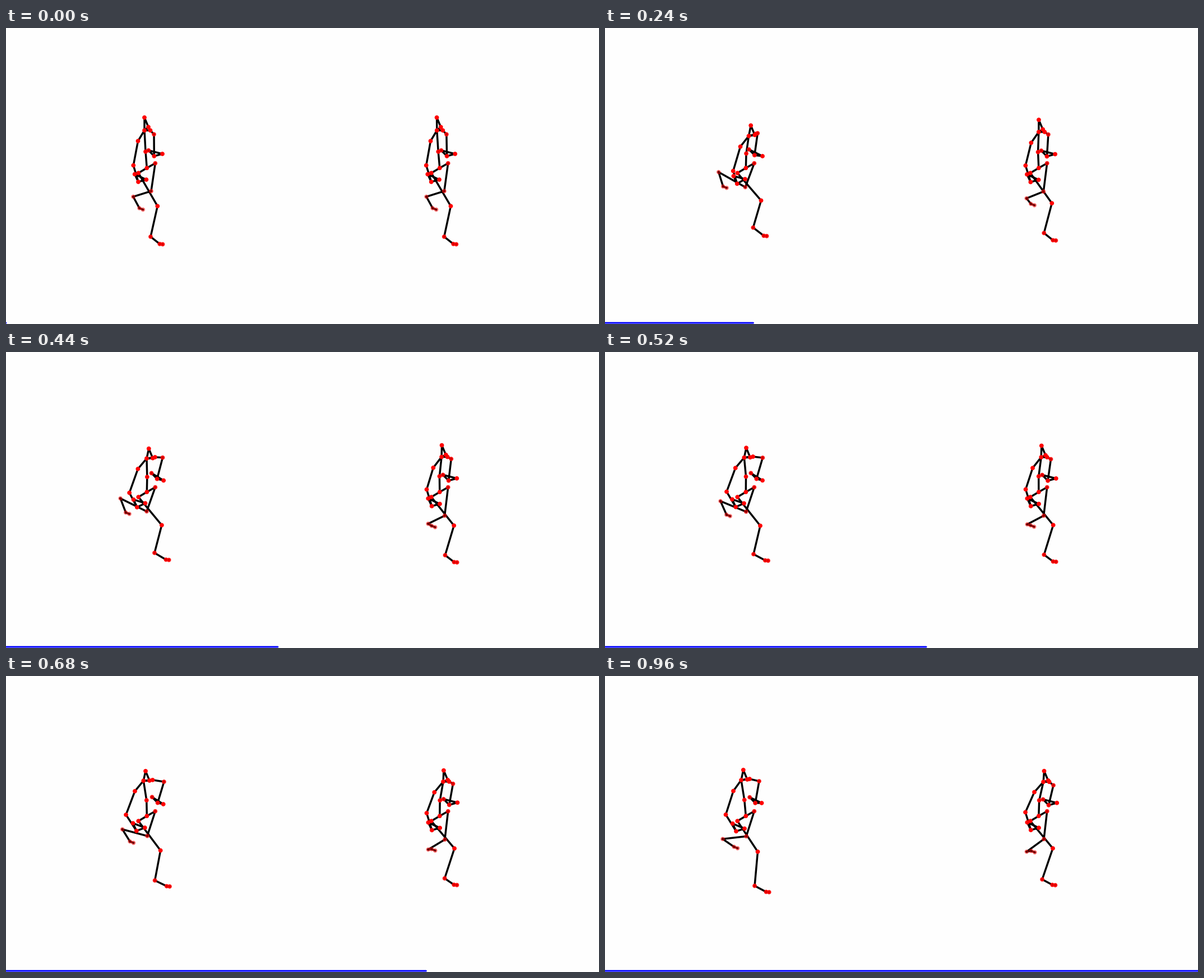
Animation of 1058x529 px, one loop 1 s. Source, as a matplotlib script:

```python
import numpy as np
import matplotlib.pyplot as plt
from matplotlib.animation import FuncAnimation

W, H, DPI = 1058, 529, 100
FRAMES, STEP = 25, 40

CHAINS = ["root rhip rknee rankle rfoot rtoe",
          "root lhip lknee lankle lfoot ltoe",
          "root spine neck nose head neck",
          "neck collar lshoulder lelbow lwrist lhand lelbow",
          "neck rshoulder relbow rwrist rtip rhand rwrist"]

# joints further from the viewer are more transparent
ALPHA = dict(lankle=.42, lfoot=.42, ltoe=.42, lknee=.55, lhip=.8, lshoulder=.82,
             lhand=.82, lelbow=.92, rankle=.85, rfoot=.85, rtoe=.85, spine=.92)

# pose from which both figures start
POSE = dict(
    root=(251.3, 250.2), spine=(249, 221), neck=(247, 183), nose=(254, 177),
    head=(247, 160), collar=(257.5, 183),
    lshoulder=(264, 190), lelbow=(264.3, 229), lwrist=(279, 225), lhand=(254.3, 218.7),
    rshoulder=(235.5, 202), relbow=(227.3, 245.5), rwrist=(236, 275),
    rhand=(229.7, 261.3), rtip=(250.3, 271),
    rhip=(236.3, 259.2), rknee=(270.3, 318.3), rankle=(258, 373),
    rfoot=(274.3, 386), rtoe=(279.5, 386.5),
    lhip=(266.3, 241.7), lknee=(259, 291.5), lankle=(227, 301.5),
    lfoot=(238, 322), ltoe=(244.3, 324.5))

# shifts from the starting pose at the key times; joints that move alike share one
STRIDE = {
    "spine": [(3, 3.3), (2.5, 1.7), (-.3, .5)],
    "neck": [(9.5, 10), (1.3, 5.7), (-4, 3)],
    "head nose": [(13.2, 14.2), (5, 11.3), (-.2, 7.9)],
    "collar": [(11.5, 6.3), (6.5, 4), (.5, 1)],
    "lshoulder": [(8.3, -2), (17.3, -1), (11, -2)],
    "lelbow lhand": [(2.5, -1.7), (6, -2.3), (3.8, -2)],
    "lwrist": [(2, 4), (2, 4.5), (.5, 2)],
    "rshoulder": [(6, 10), (-2.8, 5.3), (-6.5, 3.5)],
    "relbow": [(1.4, 10), (-10.3, 4.2), (-11.8, 2.3)],
    "rwrist rhand": [(-.3, 3.3), (-2.8, 2), (-2, 2.5)],
    "rtip": [(-.3, -1), (-2.3, -.5), (-1.3, 1.7)],
    "rknee": [(8.2, -10), (6.7, -7.8), (2.2, -4.3)],
    "rankle": [(6.3, -16.3), (7, -11.7), (9, 2)],
    "rfoot rtoe": [(9, -14.7), (11.5, -13.6), (13.2, -.2)],
    "lknee": [(-8.7, -7), (-7.3, -6), (-7, -5)],
    "lankle": [(-24.3, -44), (-21, -35), (-17, -10.2)],
    "lfoot ltoe": [(-27.3, -38.8), (-21.2, -31.2), (-7.8, -16.7)],
}
SWAY = {
    "spine": [(2.5, 1.2), (3.5, 1.2)],
    "neck collar": [(9.4, 5), (13.3, 6.2)],
    "head nose": [(10.2, 7.5), (14.9, 9.8)],
    "lshoulder": [(9.6, 1.5), (14.1, 5.3)],
    "lelbow lwrist lhand": [(3.5, 1), (5, 1.8)],
    "rshoulder": [(5.5, 5.3), (8.5, 5.5)],
    "relbow": [(.8, 0), (.3, -2)],
    "rwrist rhand rtip": [(1, .5), (1, .3)],
    "rknee": [(6.2, -9), (5.5, -10.3)],
    "rankle": [(1.6, -10.7), (-1.7, -9.5)],
    "rfoot rtoe": [(1.3, -11.6), (0, -12.7)],
    "lknee": [(.8, 1), (1.1, 0)],
    "lankle": [(3.3, 6.5), (2.3, 12.5)],
    "lfoot ltoe": [(-2, -12.2), (-.8, -9.4)],
}


def glide(times, points):
    """Smooth curve through the points, sampled at every frame."""
    t, p = np.array(times, float), np.array(points, float)
    slope = np.gradient(p, t, axis=0, edge_order=2)
    x = np.arange(FRAMES)
    k = np.clip(np.searchsorted(t, x, side="right") - 1, 0, len(t) - 2)
    h = (t[k + 1] - t[k])[:, None]
    u = (x - t[k])[:, None] / h
    return ((1 + 2 * u) * (1 - u) ** 2 * p[k] + u * (1 - u) ** 2 * h * slope[k]
            + u * u * (3 - 2 * u) * p[k + 1] + u * u * (u - 1) * h * slope[k + 1])


class Skeleton:
    def __init__(self, ax, pose, times, motion):
        self.paths = {n: np.tile(np.array(p, float), (FRAMES, 1)) for n, p in pose.items()}
        for names, shifts in motion.items():
            shift = glide([0] + times, [(0, 0)] + shifts)
            for n in names.split():
                self.paths[n] += shift
        self.line, = ax.plot([], [], color="black", lw=2.5, zorder=2)
        colors = [(1, 0, 0, ALPHA.get(n, 1)) for n in pose]
        self.dots = ax.scatter(*zip(*pose.values()), s=20, c=colors, lw=1.1, zorder=3)

    def draw(self, i):
        pts = []
        for chain in CHAINS:
            names = chain.split()
            for a, b in zip(names, names[1:]):
                pts += [self.paths[a][i], self.paths[b][i], (np.nan, np.nan)]
        self.line.set_data(*zip(*pts))
        self.dots.set_offsets([p[i] for p in self.paths.values()])


fig = plt.figure(figsize=(W / DPI, H / DPI), dpi=DPI, facecolor="#fefefe")
ax = fig.add_axes([0, 0, 1, 1])
ax.set_xlim(0, W)
ax.set_ylim(H, 0)
ax.axis("off")
ax.set_autoscale_on(False)

# the second figure stands half a stage further right, tilted very slightly
tilted = {n: (x + 522.5 + .01 * (y - 250), y) for n, (x, y) in POSE.items()}
figures = [Skeleton(ax, POSE, [6, 13, 24], STRIDE),
           Skeleton(ax, tilted, [13, 24], SWAY)]
bar, = ax.plot([], [], color="blue", lw=2.1, solid_capstyle="round", snap=False, zorder=4)


def update(i):
    for f in figures:
        f.draw(i)
    bar.set_data([-3, W * i / (FRAMES - 1)], [527, 527])
    return [bar] + [part for f in figures for part in (f.line, f.dots)]


anim = FuncAnimation(fig, update, frames=FRAMES, interval=STEP,
                     init_func=lambda: update(0), repeat=True, repeat_delay=0)
plt.show()
```
